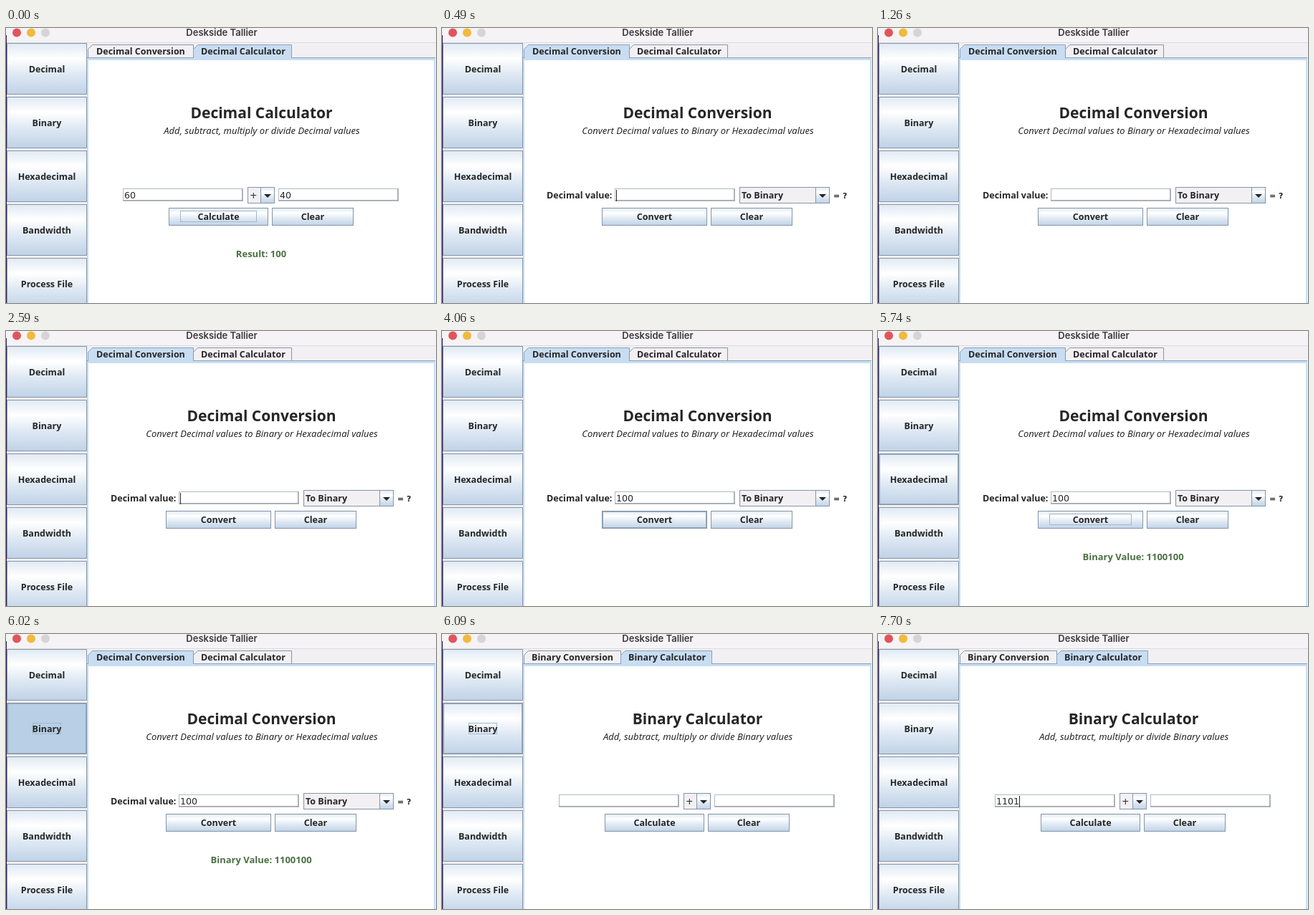
Write an HTML page with a canvas that moves like this. It is 600 px wide and 384 px high and loops after 8000 ms.

```html
<!DOCTYPE html>
<html lang="en">
<head>
<meta charset="utf-8">
<title>Deskside Tallier</title>
<style>
  html, body { margin: 0; overflow: hidden; }
  canvas { display: block; }
</style>
</head>
<body>
<canvas id="stage" width="600" height="384"></canvas>
<script>
const g = document.getElementById('stage').getContext('2d');
const LOOP = 8000;
const EDGE = '#8595a6', BLUE = '#c8ddf2', PANEL = '#f2f0f3', INK = '#262626', LINE = '#8aa2bd';
const noto = (style, size) => `${style} ${size}px "Noto Sans", sans-serif`;
const BOLD = noto('bold', 12.5);
const DIGITS = '12.6px "DejaVu Sans", sans-serif';
const DIGIT_W = 8;

const between = (t, a, b) => t >= a && t < b;
// Value of the last [time, value] step reached
const at = (t, steps) => steps.reduce((v, [s, x]) => t >= s ? x : v, '');

function rect(x, y, w, h, fill) {
  g.fillStyle = fill;
  g.fillRect(x, y, w, h);
}

function frame(x, y, w, h, color) {
  g.strokeStyle = color;
  g.lineWidth = 1;
  g.strokeRect(x + .5, y + .5, w - 1, h - 1);
}

function text(s, x, y, { font = BOLD, align = 'left', color = INK } = {}) {
  g.font = font;
  g.textAlign = align;
  g.fillStyle = color;
  g.fillText(s, x, y);
}

function metal(x, y, w, h) {
  const m = g.createLinearGradient(0, y, 0, y + h);
  m.addColorStop(0, '#dfe9f4');
  m.addColorStop(.3, '#ffffff');
  m.addColorStop(.6, '#dfe9f4');
  m.addColorStop(1, '#bfd2e6');
  rect(x, y, w, h, m);
}

function button(label, x, y, w, h, { hover, pressed, focus } = {}) {
  if (pressed) rect(x, y, w, h, '#b8cfe5');
  else metal(x, y, w, h);
  frame(x, y, w, h, EDGE);
  if (hover || pressed) frame(x + 1, y + 1, w - 2, h - 2, '#95a9c2');
  if (focus) frame(...focus, '#a3b8cc');
  text(label, x + w / 2, y + h / 2 + 4.5, { align: 'center' });
}

function field(x, value = '', caret = false) {
  rect(x, 224, 168, 18, '#ffffff');
  frame(x, 224, 168, 18, '#b3b9bf');
  rect(x, 240, 168, 1, '#a3aab1');
  rect(x + 166, 224, 1, 18, '#a3aab1');
  text(value, x + 2, 238, { font: DIGITS });
  if (caret) rect(x + 2 + value.length * DIGIT_W, 226, 1, 16, '#222222');
}

function combo(label, x, w, font) {
  const ax = x + w - 20;
  rect(x, 222, w, 23, PANEL);
  metal(ax, 222, 20, 23);
  frame(x, 222, w, 23, EDGE);
  rect(ax, 222, 1, 23, EDGE);
  g.fillStyle = INK;
  g.beginPath();
  g.moveTo(ax + 5, 232);
  g.lineTo(ax + 15, 232);
  g.lineTo(ax + 10, 237);
  g.fill();
  text(label, x + 3, 238, { font });
}

function tab(label, x, right, textX, active) {
  g.beginPath();
  g.moveTo(x + .5, 42);
  g.lineTo(x + .5, 29.5);
  g.lineTo(x + 6.5, 23.5);
  g.lineTo(right - .5, 23.5);
  g.lineTo(right - .5, 42);
  g.fillStyle = active ? BLUE : PANEL;
  g.fill();
  g.strokeStyle = active ? LINE : EDGE;
  g.lineWidth = 1;
  g.stroke();
  if (!active) rect(x, 41, right - x, 1, LINE);
  text(label, textX, 37);
}

function tabs(kind, split, right, active) {
  const start = kind === 'Decimal' ? 126 : 125;
  tab(kind + ' Conversion', 114, split, start, active === 0);
  tab(kind + ' Calculator', split - 1, right, split + 10, active === 1);
}

function heading(title, note) {
  text(title, 356.5, 126, { font: noto('bold', 21), align: 'center' });
  text(note, 357, 148, { font: noto('italic', 13), align: 'center' });
}

function result(s) {
  text(s, 356, 320, { font: noto('bold', 13), align: 'center', color: '#4b7043' });
}

function calculator(kind, left, right, caret, focus) {
  heading(kind + ' Calculator', `Add, subtract, multiply or divide ${kind} values`);
  field(163, left, caret);
  combo('+', 337, 38, DIGITS);
  field(380, right);
  button('Calculate', 227, 251, 139, 25, { focus: focus && [243, 255, 107, 16] });
  button('Clear', 371, 251, 114, 25);
}

function conversion(t) {
  heading('Decimal Conversion', 'Convert Decimal values to Binary or Hexadecimal values');
  text('Decimal value:', 146, 238);
  const caret = between(t, 490, 1050) || between(t, 1540, 2100) || between(t, 2590, 3920);
  field(241, at(t, [[3080, '1'], [3290, '10'], [3430, '100']]), caret);
  combo('To Binary', 415, 126);
  text('= ?', 546, 238, { font: 'bold 11px "DejaVu Sans", sans-serif' });
  button('Convert', 223, 251, 147, 25, {
    hover: between(t, 1050, 1260) || between(t, 4060, 5040),
    pressed: between(t, 4340, 4410),
    focus: between(t, 4340, 5950) && [239, 255, 115, 16]
  });
  button('Clear', 375, 251, 114, 25);
  if (t >= 4410) result('Binary Value: 1100100');
}

function sidebar(t) {
  const hover = at(t, [[5740, 'Hexadecimal'], [5810, ''], [5880, 'Binary'], [6300, '']]);
  ['Decimal', 'Binary', 'Hexadecimal', 'Bandwidth', 'Process File'].forEach((name, i) => {
    const binary = name === 'Binary';
    button(name, 1, 21 + i * 75, 112, 72, {
      hover: hover === name,
      pressed: binary && between(t, 5950, 6090),
      focus: binary && between(t, 5950, 6720) && [37, 124, 40, 16]
    });
  });
}

function chrome() {
  rect(0, 0, 600, 384, PANEL);
  rect(0, 0, 600, 20, '#f5f3f5');
  rect(0, 20, 600, 1, '#dddbde');
  ['#e2545b', '#f1ba3e', '#d6d4d6'].forEach((c, i) => {
    g.fillStyle = c;
    g.beginPath();
    g.arc(15 + i * 20, 6.5, 6, 0, 7);
    g.fill();
  });
  text('Deskside Tallier', 301, 11, { font: '600 13px Inter, sans-serif', align: 'center', color: '#3b393b' });
  rect(113, 41, 486, 343, BLUE);
  rect(113, 41, 486, 1, LINE);
  rect(115, 45, 482, 339, '#ffffff');
}

function draw(t) {
  chrome();
  sidebar(t);
  rect(0, 10, 1, 374, '#30204c');
  if (t < 490) {
    tabs('Decimal', 262, 399, 1);
    calculator('Decimal', '60', '40', false, t < 420);
    result('Result: 100');
  } else if (t < 6090) {
    tabs('Decimal', 262, 399, 0);
    conversion(t);
  } else {
    tabs('Binary', 250, 377, 1);
    const typed = at(t, [[7140, '1'], [7350, '11'], [7490, '110'], [7700, '1101']]);
    calculator('Binary', typed, '', t >= 6720);
  }
}

function tick() {
  draw(performance.now() % LOOP);
  requestAnimationFrame(tick);
}
tick();
</script>
</body>
</html>
```
